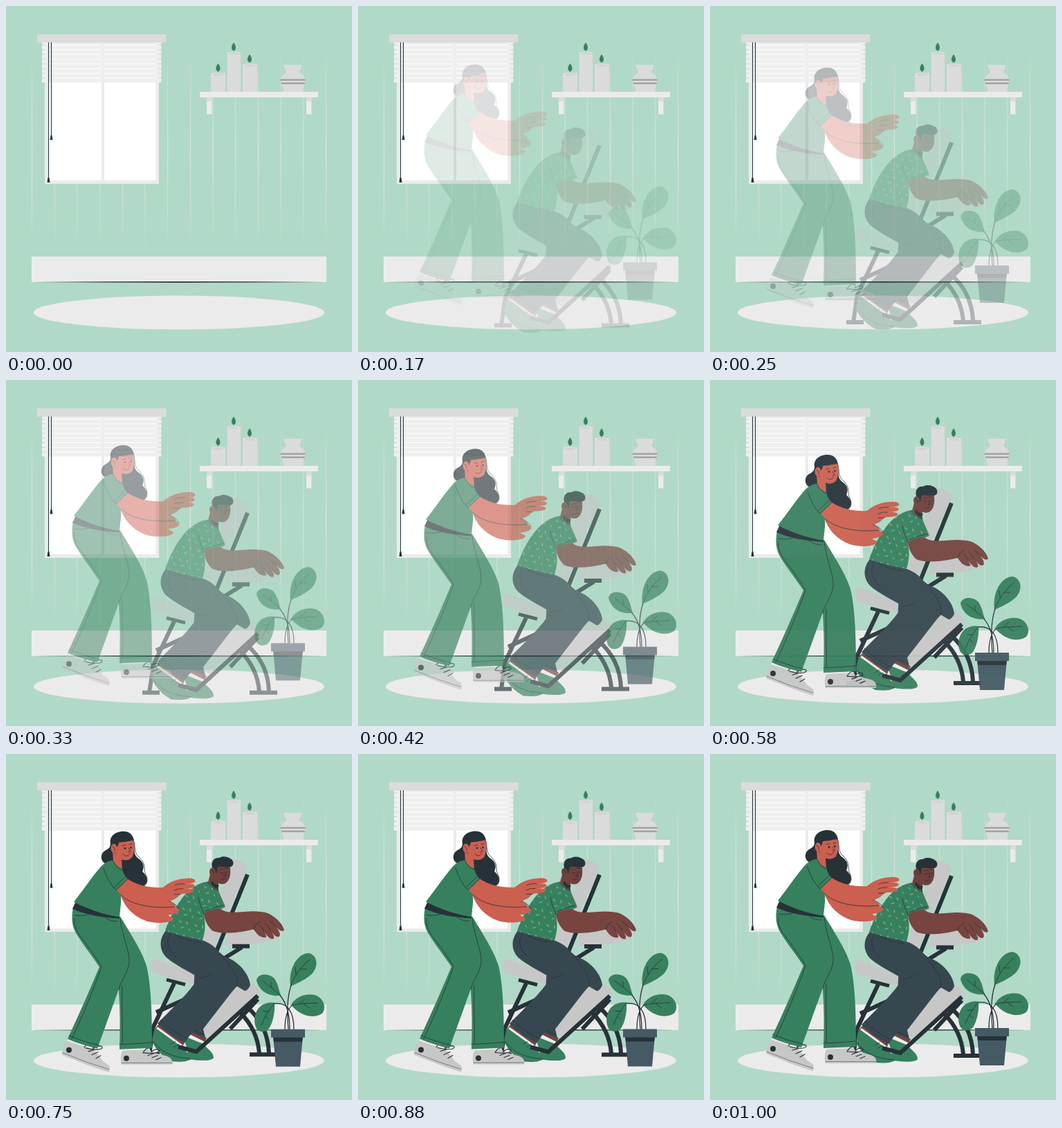
Recreate the animation shown at these times as an HTML page. Size 500 by 500 pixels, loop 1.04 s.

```html
<!DOCTYPE html>
<html lang="en">
<head>
<meta charset="utf-8">
<title>Massage chair</title>
<style>
html, body { margin: 0; width: 100%; height: 100%; overflow: hidden; background: #b1d9c7 }
svg { display: block; width: 100vw; height: 100vh }
.light { fill: #ebebeb }
.mid { fill: #dbdbdb }
.white { fill: #fff }
.green { fill: #37805e }
.ink { fill: #263238 }
.pad { fill: #c7c7c7 }
.skin { fill: #cb5f50 }
.brown { fill: #774440 }
.face { fill: #6f403c }
.navy { fill: #37474f }
.pot { fill: #455a64 }
.bar, .line { fill: none; stroke: #263238 }
.bar { stroke-width: 6 }
.line { stroke-width: .8; stroke-linecap: round; stroke-linejoin: round }
</style>
</head>
<body>
<svg viewBox="0 0 500 500">
  <defs>
    <pattern id="ticks" width="23" height="19" patternUnits="userSpaceOnUse" patternTransform="rotate(14)">
      <path d="M3 4l3 1.500M14 3l1 3M8 13l3-1.500M19 12l2 2" stroke="#b4d6c5" stroke-width=".9" stroke-linecap="round"/>
    </pattern>
    <path id="flame" class="green" d="M0-13C4-8 4-3 0-1C-4-3-4-8 0-13Z"/>
    <path id="tee" d="M292 186C296 193 302 196 307 199C310 207 314 215 317 223C307 228 296 228 286 233C288 245 289 256 284 271C266 267 248 264 230 257C241 226 262 189 292 186Z"/>
  </defs>

  <rect width="500" height="500" fill="#b1d9c7"/>
  <path id="planks" fill="#dfe3e1"/>
  <path class="light" d="M37 362H463V399H37Z"/>
  <path class="ink" d="M37 399Q250 397 463 399Q250 400.5 37 399Z"/>
  <ellipse class="light" cx="250" cy="443" rx="210" ry="24.5"/>

  <path class="light" d="M56 53H221V257H56Z"/>
  <path class="white" d="M60.500 53H138V252H60.500ZM142 53H216.500V252H142Z"/>
  <path id="slats" fill="#efefef"/>
  <path class="mid" d="M45 41H231.500V53H45Z"/>
  <path class="line" style="stroke-width:1.100" d="M61.500 53V249M65.500 53V188"/>
  <path class="ink" d="M60.500 248h2l1 7h-4ZM64.500 187h2l1 6.500h-4Z"/>

  <path class="light" d="M290 132h7.500v24.500h-7.500ZM434 132h7.500v24.500h-7.500Z"/>
  <path class="mid" d="M290 132h7.500v6h-7.500ZM434 132h7.500v6h-7.500ZM296 97Q306 95.500 317 97V124H296ZM319.500 67Q329 65.500 339 67V124H319.500ZM342 84Q352 82.500 363 84V124H342Z"/>
  <path fill="none" stroke="#c2c2c2" stroke-width=".8" d="M300 99q6 1.500 13 0M323 69q6 1.500 12 0M346 86q6 1.500 13 0M306.500 94v4M329 64v4M352 81v4"/>
  <use href="#flame" x="306.500" y="96"/><use href="#flame" x="329" y="66"/><use href="#flame" x="352" y="83"/>
  <path class="mid" d="M401 85H427C427 91 424 93 424 96C430 99 433 104 432 109C430 115 429 119 429 124H401C401 119 399 115 397 109C396 104 400 99 405 96C405 93 402 91 401 85Z"/>
  <path stroke="#a3a3a3" stroke-width="2.500" d="M396.500 106.800H432.500M398 111.800H431.500"/>
  <path class="light" d="M280 124H451V132H280Z"/>

  <g data-from="30">
    <path class="bar" d="M338 375C355 392 364 410 366 434M348 367C369 385 379 409 380 434M352 436H392M324 399L364 356M243 333L213 396L207 436M197 436H222M217 375L259 356"/>
    <path class="pad" d="M326 158Q329 152 336 155L346 161Q351 165 348 171L320 229L300 284L283 276Z"/>
    <path class="pad" d="M322 257H385Q396 261 394 268Q372 278 316 279Z"/>
    <path class="bar" d="M349 176L303 290M327 279.500H352M341 281L312 299L300 294"/>
    <path class="pad" d="M214 297L276 320L270 335L213 318Q209 314 210 302Z"/>
    <path class="bar" style="stroke-width:5" d="M232 328L259 335"/>
    <path class="pad" d="M336 331Q350 329 358 335Q368 342 367 349L299 411L276 402Z"/>
    <path class="brown" d="M268 400L290 412L287 418L262 409ZM222 390L258 418L254 428L216 398Z"/>
    <path class="light" d="M266 407L288 418L286 422L262 411ZM219 396L255 422L253 425L217 399Z"/>
    <path class="green" d="M256 409L286 421C290 428 300 432 300 441C296 446 280 445 266 443ZM215 397L251 423C256 430 267 434 268 441C266 447 250 447 239 446C228 440 216 430 211 416Z"/>
    <path class="line" d="M213 417C222 430 236 440 267 442M238 421l7-4M243 425l7-4M278 425l6-4"/>
    <path class="navy" d="M275 270C300 274 305 290 320 296C336 302 352 320 353 336Q349 344 345 344L333 337L285 399L288 412L268 404Z"/>
    <path class="navy" d="M231 257C220 270 222 286 232 296C246 308 262 314 278 325C265 347 240 369 219 391C231 403 244 412 258 419C278 390 312 362 333 338C337 322 322 305 310 290C301 279 293 274 284 271Z"/>
    <path class="line" d="M333 338C338 323 322 306 310 290M278 325Q288 326 296 319M223 386Q242 404 262 413M237 262C230 275 235 287 247 296M243 262Q258 272 281 274M272 402L287 408"/>
    <path class="bar" d="M249 425L275 432L364 351"/>

    <path class="face" d="M296 172L292 187Q296 199 307 200L307 187Z"/>
    <path class="ink" d="M298 185Q303 192 308 191L305 196Q298 194 296 188Z"/>
    <path class="face" d="M302 162L323 160C325 170 325 180 320 186C315 192 308 190 303 186L298 178Z"/>
    <path class="ink" d="M299 168C295 160 299 151 308 152C314 148 322 151 326 154C331 159 328 166 322 165C315 166 310 163 306 165L304 174L301 173Z"/>
    <ellipse class="face" cx="298.500" cy="172" rx="4.500" ry="6"/>
    <path class="line" d="M297 169Q301 171 300 175M309 173q3 2 5 0M318 172q2 2 4 0M309 169l5-1M317 167l4 0M316 172l2 6-3 0M311 183q4 1 6-1"/>
    <use href="#tee" class="green"/>
    <use href="#tee" fill="url(#ticks)"/>
    <path class="line" d="M286 233C283 224 279 217 278 209M288 229Q301 223 316 220M291 187Q296 196 307 199"/>
    <path class="brown" d="M286 232C296 227 307 224 311 226C321 234 341 229 358 229C368 230 376 229 384 235C393 240 400 249 402 256C400 260 394 256 391 252C395 258 398 264 394 266C390 267 385 261 382 256C386 262 389 267 386 269C381 270 376 263 373 258C376 264 378 267 374 267C367 267 362 262 358 255C340 260 310 263 298 257C290 249 287 241 286 232Z"/>
    <path class="line" d="M358 255Q359 248 367 244M373 258L367 249M382 256L374 246M391 252L381 243"/>
  </g>

  <g data-from="-30">
    <path class="light" d="M91 407L134 422L132 428L88 413ZM168 422H208V428H168Z"/>
    <path class="pad" d="M88 413L120 423C127 425 132 430 138 440C143 446 150 447 150 452L149 458C127 452 104 442 81 433C81 425 84 418 88 413ZM168 427L207 425C213 431 223 432 233 435C240 438 241 442 240 447H167C165 439 166 432 168 427Z"/>
    <path class="line" style="stroke-width:.5" d="M82 430Q115 444 149 454M167 444.500H240"/>
    <circle class="ink" cx="91" cy="426" r="4"/><circle class="ink" cx="174" cy="438" r="4"/>
    <path class="line" style="stroke-width:1.200" d="M113 422C119 414 126 417 126 424C132 419 140 419 139 423C136 427 124 425 115 423M119 428l10-3M124 433l9-4M130 438l7-4M198 430C203 421 211 421 210 429C214 424 222 424 221 428C217 431 207 431 199 430M205 434l8-3M211 437l8-3M217 440l7-3"/>
    <path class="green" d="M97 220C94 236 95 248 103 260C113 276 126 292 135 306C121 339 105 376 89 410C102 416 117 420 132 424C142 396 153 366 163 338C165 368 165 396 164 425L211 423C211 390 211 338 203 304C196 282 180 258 165 233Z"/>
    <path class="line" d="M165 236C169 267 179 282 178 300C176 315 165 327 163 339M99 231C108 233 119 231 124 228M142 233Q148 240 161 240M99 236C97 250 106 260 116 273C126 287 134 298 138 306C126 340 110 378 95 410M91 405Q111 414 134 419M164 418Q188 417 211 415M168 333C167 360 169 390 168 417"/>
    <path class="ink" d="M101 211C118 222 142 228 164 231V236C141 235 113 230 96 222Z"/>

    <path class="ink" d="M151 128C149 117 158 110 170 110C179 110 184 116 185 124C187 137 183 142 191 149C200 155 200 162 197 168C206 176 206 184 199 189Q195 192 190 189C181 186 172 181 166 172L148 158C136 156 135 143 143 138C149 135 151 132 151 128Z"/>
    <path class="line" d="M184 122C188 132 184 140 192 147C203 157 199 164 201 170C207 181 203 188 198 190"/>
    <path class="skin" d="M154 138L155 153Q159 162 168 164L167 150Z"/>
    <path class="skin" d="M159 126C167 126 177 125 184 122C187 133 185 142 182 148C177 153 167 153 161 147L157 138Z"/>
    <path class="ink" d="M154 132C153 119 160 112 171 112C180 113 184 118 184 123C177 125 169 122 164 124Q162 131 159 136Z"/>
    <ellipse class="skin" cx="156" cy="134.500" rx="4.500" ry="6.500"/>
    <circle class="ink" cx="172" cy="134.500" r="1.400"/><circle class="ink" cx="180.500" cy="133.500" r="1.400"/>
    <path class="line" d="M154 132Q158 133 157 138M168 131q2-2 5-1M178 129l4-1M177 134l3 5-3 1M169 143Q174 149 179 142"/>

    <path class="skin" d="M164 196C168 216 183 233 204 240C219 244 241 242 242 236C240 233 234 233 235 231C244 230 252 227 250 223C246 217 228 217 215 212L180 191Z"/>
    <path class="green" d="M155 152C157 158 164 163 168 164C169 170 172 175 177 180C170 185 164 190 165 198C168 208 165 221 164 234C140 230 117 222 98 212C112 194 125 175 137 161C143 155 149 152 155 152Z"/>
    <path class="skin" d="M176 179C191 189 211 192 227 191C236 183 246 179 261 178C270 177 275 180 273 183C270 186 262 185 258 186C267 185 275 186 272 190C269 193 261 192 256 193C264 192 273 193 271 197C267 201 258 199 252 201C246 208 241 209 237 211C240 215 246 214 245 220C220 222 196 220 179 210C169 204 163 199 160 195Z"/>
    <path class="line" d="M166 202C181 217 213 222 244 219M236 211Q244 213 250 222M258 186Q250 185 244 188M256 193Q249 192 243 195M252 201L243 201"/>
    <path class="line" d="M141 163C145 176 151 187 159 195L176 179M156 191L173 175M155 153Q159 162 168 166"/>
  </g>

  <g data-from="-30">
    <path class="line" style="stroke-width:1.300" d="M408 396C406 370 406 350 412 333M410 396C410 375 406 358 395 346M403 396C403 372 410 358 424 358M416 396C416 372 408 356 386 359"/>
    <path class="green" d="M411 334C408 310 420 286 438 286C451 290 452 306 441 317C432 325 420 330 411 334ZM397 347C380 350 365 340 362 325C364 314 382 315 388 323C393 330 394 338 397 347ZM412 361C418 349 434 343 448 347C460 352 463 366 457 373C444 382 424 376 412 361ZM388 358C389 370 386 386 380 395C374 402 364 400 361 393C356 380 362 366 370 361C376 358 384 356 388 358Z"/>
    <path class="line" d="M411 334Q420 310 439 295M419 316l-1-10M425 309l9 0M397 347Q383 335 371 326M383 335l0-7M412 361Q430 358 450 358M430 359l8 6M424 359l8-7M388 358Q376 372 369 390M380 370l-8 0M375 377l5 5"/>
    <path class="pot" d="M386 406H429L425 450H390Z"/>
    <path class="ink" d="M386 407H429L428 414H387Z"/>
    <path class="pot" d="M383 396H432V408H383Z"/>
  </g>
</svg>
<script>
const find = id => document.getElementById(id);
const repeat = (n, f) => Array.from({ length: n }, (_, i) => f(i)).join('');

find('planks').setAttribute('d', repeat(14, i =>
  `M${37.5 + i * 32.7} 52l.6 155l-.6 155l-.6-155Z`));
find('slats').setAttribute('d', repeat(9, i =>
  `M52 ${50.2 + i * 6.8}H224.500v5.800H52Z`));

// Overshooting ease: cubic-bezier(.36, -.01, .5, 1.38)
const bezier = (a, b, u) => 3 * (1 - u) ** 2 * u * a + 3 * (1 - u) * u * u * b + u ** 3;
function ease(x) {
  let low = 0, high = 1;
  for (let i = 0; i < 24; i++) {
    const u = (low + high) / 2;
    if (bezier(.36, .5, u) < x) low = u; else high = u;
  }
  return bezier(-.01, 1.38, low);
}

const LOOP = 1040, FPS = 24;
const groups = document.querySelectorAll('[data-from]');
const start = performance.now();

function draw() {
  const time = Math.max(0, performance.now() - start) % LOOP;
  // The motion advances in steps of 1/24 s.
  const step = Math.floor((time + 5) * FPS / 1000);
  const p = step < 2 ? 0 : ease(Math.min(1, (step + .9) / FPS));
  for (const g of groups) {
    g.setAttribute('transform', `translate(0 ${g.dataset.from * (1 - p)})`);
    g.setAttribute('opacity', Math.min(1, Math.max(0, p)));
  }
  requestAnimationFrame(draw);
}
draw();
</script>
</body>
</html>
```
